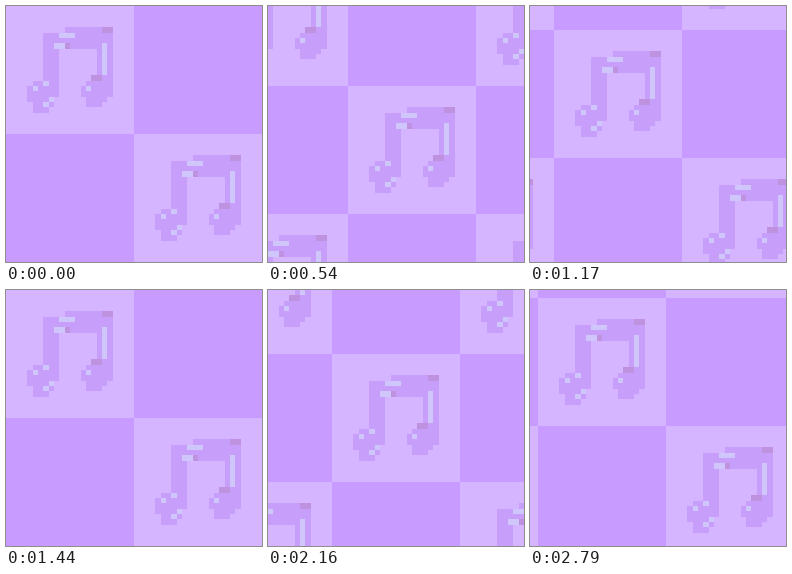
Write an HTML page without scripts that moves like this. It is 256 px wide and 256 px high and loops after 2880 ms.

```html
<!DOCTYPE html>
<html lang="en">
<head>
<meta charset="utf-8">
<title>Music note checkerboard</title>
<style>
  html, body {
    margin: 0;
    width: 100%;
    height: 100%;
    overflow: hidden;
    background: #c79bff;
  }
  svg {
    display: block;
    width: 256px;
    height: 256px;
    shape-rendering: crispEdges;
  }
  .tile { fill: #d5b5ff; }
  .note { fill: #c79ffb; }
  .shine { fill: #cfc6fb; }
  .blush { fill: #be92de; }

  /* The board repeats every 128px along the diagonal. */
  .board { animation: drift 1440ms steps(16, end) infinite; }
  @keyframes drift {
    to { transform: translate(-128px, -128px); }
  }
</style>
</head>
<body>
<svg viewBox="0 0 256 256">
  <defs>
    <g id="tile">
      <rect class="tile" width="128" height="128"/>
      <!-- 24 cells per tile, note inset by 4 -->
      <g transform="scale(5.33333) translate(4 4)">
        <path class="note" d="M7 0h9v13h-1v1h-1v1h-3v-2h-1v-2h1v-1h1v-1h1v-5h-7v9h-1v2h-1v1h-3v-2h-1v-3h1v-1h2v-9h4z"/>
        <path class="shine" d="M6 1h3v1h-3z M5 3h2v1h-2z M14 3h1v6h-1z M3 10h1v1h-1z M1 11h1v1h-1z M4 13h1v1h-1z M3 14h1v1h-1z M11 11h1v1h-1z"/>
        <path class="blush" d="M14 0h2v1h-2z M7 3h1v1h-1z M12 9h2v1h-2z"/>
      </g>
    </g>
  </defs>
  <rect width="256" height="256" fill="#c79bff"/>
  <g class="board">
    <use href="#tile"/>
    <use href="#tile" x="256"/>
    <use href="#tile" x="128" y="128"/>
    <use href="#tile" y="256"/>
    <use href="#tile" x="256" y="256"/>
  </g>
</svg>
</body>
</html>
```
